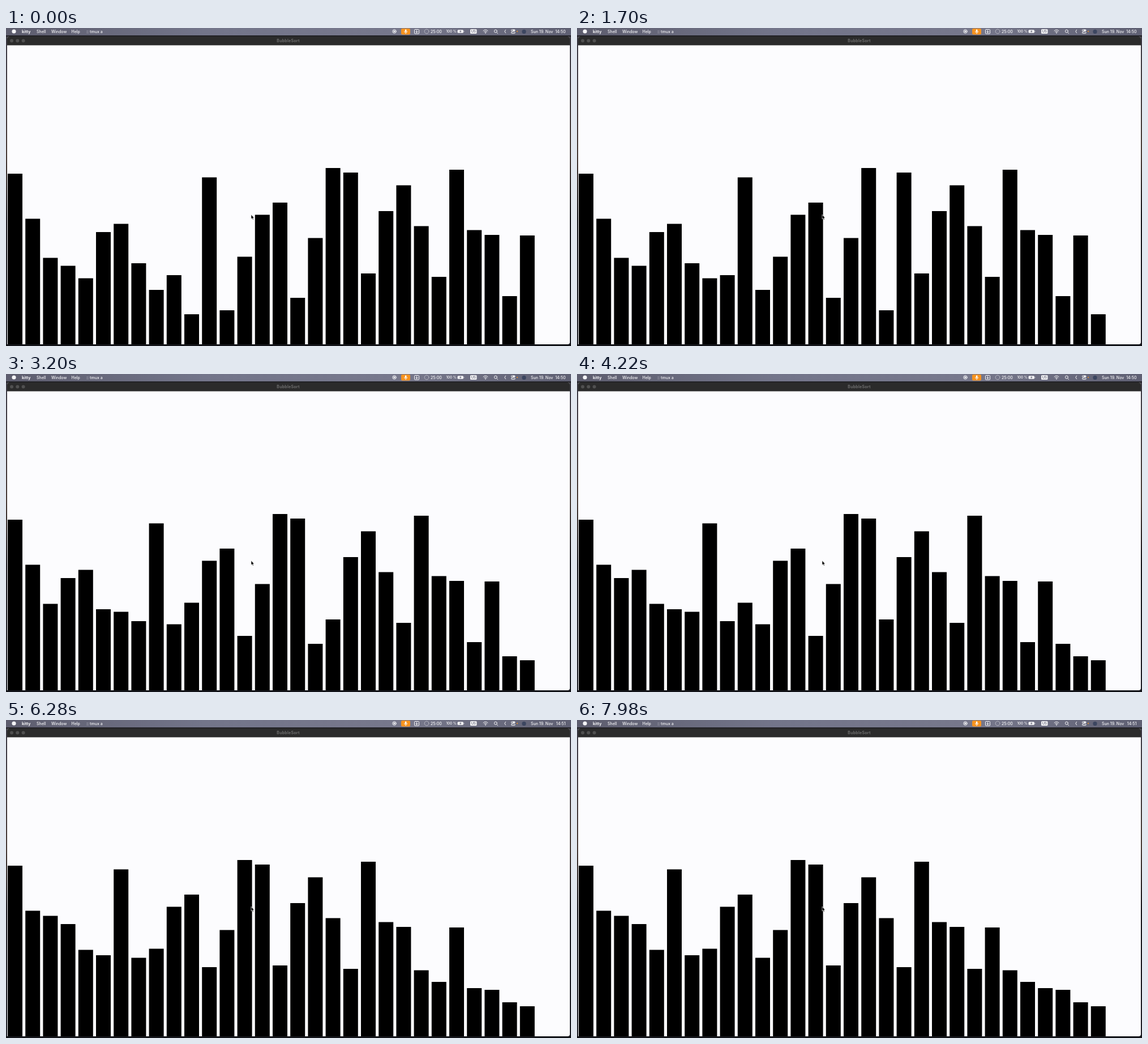
An HTML page that plays this animation: 998x561 px, repeating every 8 s.

```html
<!DOCTYPE html>
<html lang="en">
<head>
<meta charset="utf-8">
<title>BubbleSort</title>
<style>
  html, body { margin: 0; width: 100%; height: 100%; overflow: hidden; background: #0c0c0e; }
  svg { display: block; width: 998px; height: 561px; }
  text { font: 500 7px Inter, Roboto, sans-serif; fill: #f6f6f8; white-space: pre; }
  .bold { font-weight: 700; }
  .title { font-weight: 700; fill: #6e6e6e; letter-spacing: .2px; }
  .line { fill: none; stroke: #f4f4f6; stroke-width: 1; stroke-linecap: round; }
</style>
</head>
<body>
<svg viewBox="0 0 998 561" xmlns="http://www.w3.org/2000/svg">
  <defs>
    <linearGradient id="menu">
      <stop offset="0" stop-color="#5d5d6e"/>
      <stop offset=".35" stop-color="#73758a"/>
      <stop offset=".7" stop-color="#77788c"/>
      <stop offset="1" stop-color="#5f6073"/>
    </linearGradient>
    <linearGradient id="side" x2="0" y2="1">
      <stop offset="0" stop-color="#3c3c48"/>
      <stop offset=".4" stop-color="#4a3d38"/>
      <stop offset=".6" stop-color="#15141a"/>
      <stop offset="1" stop-color="#1c1d24"/>
    </linearGradient>
  </defs>
  <rect width="998" height="561" fill="url(#side)"/>
  <rect y="557" width="998" height="4" fill="#14151a"/>
  <rect width="998" height="13.5" fill="url(#menu)"/>
  <rect y="13" width="998" height="2" fill="#222226"/>

  <path d="M2 558V19q0-4 4-4H992q4 0 4 4V554q0 4-4 4z" fill="#fcfcfe"/>
  <path d="M2 30.5V19q0-4 4-4H992q4 0 4 4V30.5z" fill="#2b2b2b"/>
  <g fill="#505050">
    <circle cx="10" cy="22.6" r="3"/><circle cx="20.3" cy="22.6" r="3"/><circle cx="30.6" cy="22.6" r="3"/>
  </g>
  <text class="title" x="498.5" y="25.2" text-anchor="middle">BubbleSort</text>

  <circle cx="14" cy="6" r="3.6" fill="#f6f6f8"/>
  <text class="bold" x="28" y="8.5">kitty</text>
  <text x="54" y="8.5">Shell</text>
  <text x="80" y="8.5">Window</text>
  <text x="115.5" y="8.5">Help</text>
  <text x="142" y="8.5">:: tmux a</text>

  <circle class="line" cx="686" cy="6" r="3.2"/>
  <rect x="684.5" y="4.5" width="3" height="3" fill="#f4f4f6"/>
  <rect x="698" y="1" width="16" height="10.5" rx="2" fill="#f7931e"/>
  <rect x="704.8" y="2.6" width="2.6" height="4.6" rx="1.3" fill="#fff"/>
  <path class="line" stroke-width=".8" d="M703.6 6q0 2.4 2.5 2.4T708.6 6M706.1 8.4V9.8"/>
  <rect class="line" x="721.5" y="2.5" width="8" height="7.5" rx="1"/>
  <path class="line" d="M725.5 4.2V8M723.8 6.5L725.5 8.2L727.2 6.5"/>
  <circle class="line" cx="743" cy="6" r="3.8" stroke-dasharray="1 1.2" opacity=".6"/>
  <text x="750" y="8.5">25:00</text>
  <text x="777.5" y="8.3" style="font-size:6.2px">100 %</text>
  <rect x="797.5" y="3.3" width="10.4" height="5.4" rx="1.5" fill="#f4f4f6"/>
  <path d="M808.6 5v2q1 -.2 1-1t-1-1z" fill="#d8d8de"/>
  <path d="M803.4 3.4L800.8 6.4H802.6L801.9 8.6L804.7 5.6H802.9z" fill="#666779"/>
  <rect x="820" y="2" width="11.5" height="8" rx="1.5" fill="#f4f4f6"/>
  <text x="825.8" y="8.2" text-anchor="middle" style="font-size:6px;fill:#626376">US</text>
  <path class="line" d="M843 4.9q4-3.6 8 0M844.6 6.7q2.4-2.1 4.8 0"/>
  <circle cx="847" cy="8.6" r="1" fill="#f4f4f6"/>
  <path class="line" d="M867 8L868.6 9.6"/>
  <circle class="line" cx="864.9" cy="5.6" r="2.5"/>
  <path class="line" d="M882.6 3.2L880.8 6L882.6 8.8"/>
  <rect x="892" y="2.4" width="7.6" height="3.2" rx="1.6" fill="#f4f4f6"/>
  <rect class="line" x="892.4" y="6.9" width="6.8" height="2.6" rx="1.3" stroke-width=".8"/>
  <circle cx="894" cy="4" r=".9" fill="#666779"/>
  <circle cx="903" cy="6" r="1" fill="#f7931e"/>
  <circle cx="915" cy="6.4" r="3.6" fill="#3c4660"/>
  <text x="927" y="8.5">Sun 19. Nov</text>
  <text id="clock" x="988.5" y="8.5" text-anchor="end">14:50</text>

  <g id="bars"></g>
  <path d="M433 329.3V337L434.8 335.5L436 338.2L437.3 337.6L436.2 335H438.4z" fill="#000" stroke="#fff" stroke-width=".6"/>
</svg>
<script>
const LOOP = 8000, FLOOR = 558, PITCH = 31.2, FIRST = 10;
const tops = [257, 336.5, 405.5, 419.5, 441.5, 360, 345.5, 415, 462, 436,
  505, 263.5, 498, 403.5, 329.5, 308, 476, 370.5, 247, 255,
  433, 323, 277.5, 349.5, 439, 250, 356.5, 365, 473, 366];
const n = tops.length;
const clock = document.getElementById('clock');
const group = document.getElementById('bars');

const bars = tops.map((_, i) => {
  const r = document.createElementNS('http://www.w3.org/2000/svg', 'rect');
  r.setAttribute('x', (3 + PITCH * i).toFixed(1));
  r.setAttribute('width', 26);
  return group.appendChild(r);
});

// Comparisons arrive in bursts of three, 20 ms apart, every 140 ms.
function stepAt(t) {
  if (t >= 300 && t < 440) t = 300;    // short stalls
  if (t >= 1120 && t < 1240) t = 1120;
  const u = t + 20;
  const step = 9 + 3 * Math.floor(u / 140) + Math.min(2, Math.floor(u % 140 / 20));
  return t < 1820 ? step : step - 1;
}

// Every pass takes n steps; the last one compares nothing.
function sortedTo(step) {
  const a = tops.slice();
  for (let k = FIRST; k < step; k++) {
    const j = k % n;
    if (j < n - 1 && a[j] > a[j + 1]) [a[j], a[j + 1]] = [a[j + 1], a[j]];
  }
  return a;
}

let shown = -1;
function draw(t) {
  const step = stepAt(t);
  if (step !== shown) {
    sortedTo(step).forEach((y, i) => {
      bars[i].setAttribute('y', y);
      bars[i].setAttribute('height', FLOOR - y);
    });
    shown = step;
  }
  clock.textContent = t < 5740 ? '14:50' : '14:51';
}

const start = performance.now();
function tick() {
  draw((performance.now() - start) % LOOP);
  requestAnimationFrame(tick);
}
tick();
</script>
</body>
</html>
```
